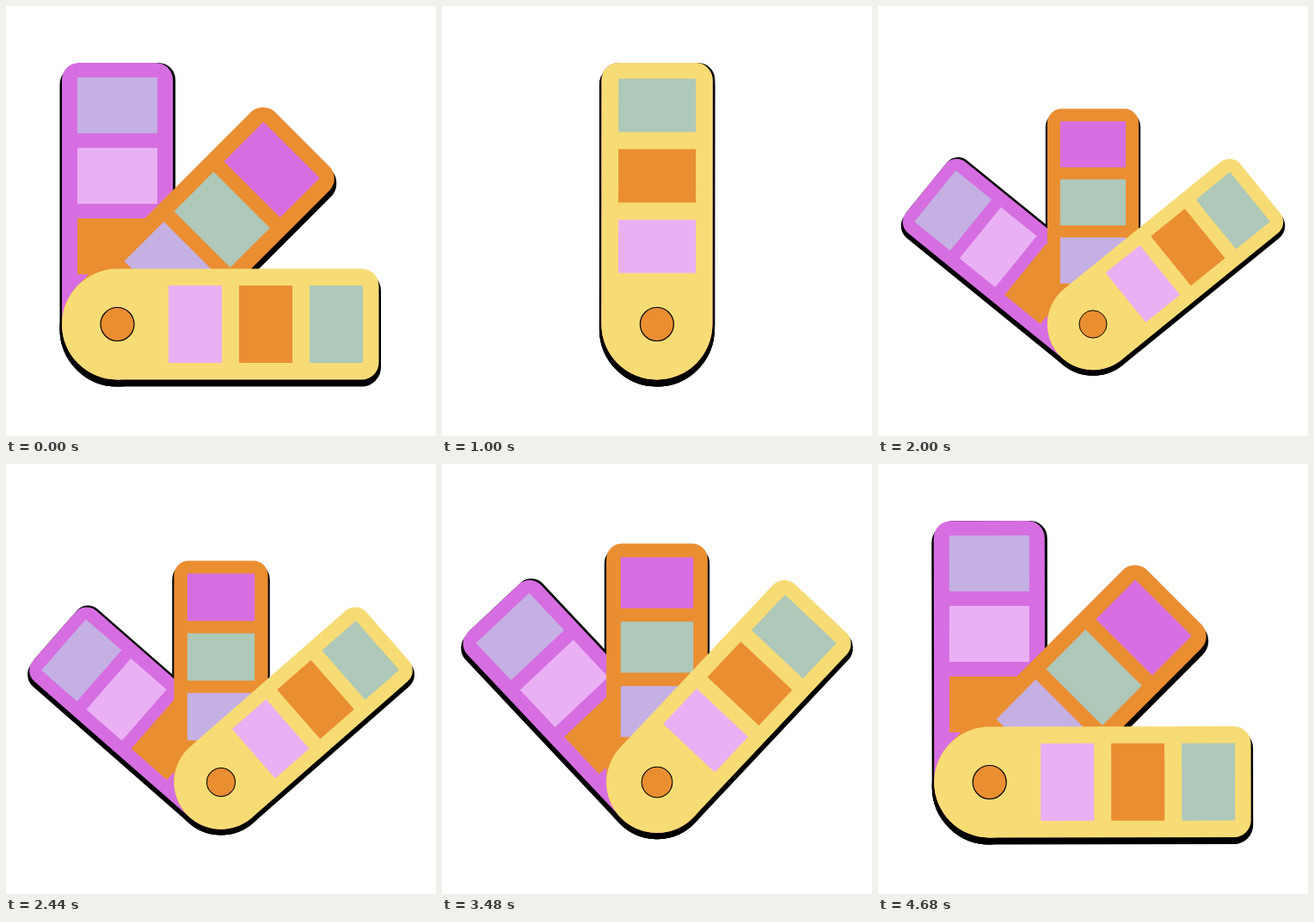
Write an HTML page that moves like this. It is 500 px wide and 500 px high and loops after 5 s.

```html
<!DOCTYPE html>
<html lang="en">
<head>
<meta charset="utf-8">
<title>Swatch fan</title>
<style>
html, body { margin: 0; width: 100%; height: 100%; overflow: hidden; background: #fff; }
svg { display: block; width: 100vw; height: 100vh; }
</style>
</head>
<body>
<svg viewBox="0 0 500 500">
  <g id="fan">
    <g id="shadow" transform="translate(0 5.5)" stroke="#000" stroke-width="5"></g>
    <g id="cards"></g>
    <circle r="19.5" fill="#ea8e32" stroke="#000" stroke-width="1.2"/>
  </g>
</svg>
<script>
const LOOP = 5000;
const PURPLE = '#d66ee1', ORANGE = '#ea8e32', YELLOW = '#f7dc75';
const LILAC = '#c5b0e4', PINK = '#eab0f4', SAGE = '#aec8b9';
const CARD = 'M-64.5 0V-284a20 20 0 0 1 20-20H44.5a20 20 0 0 1 20 20V0A64.5 64.5 0 0 1-64.5 0Z';

// swatches run from the outer end towards the pin
const DECK = [
  { fill: PURPLE, swatches: [LILAC, PINK, ORANGE], w: 93, h: 65, top: -287, edge: 3 },
  { fill: ORANGE, swatches: [PURPLE, SAGE, LILAC], w: 92.5, h: 65, top: -286.5 },
  { fill: YELLOW, swatches: [SAGE, ORANGE, PINK], w: 90, h: 62, top: -285.5 }
];

// x of the pin, scale, angle of each card
const OPEN = [129.5, 1, 0, 45, 90];
const SHUT = [250, 1, 0, 0, 0];
const WIDE = [250, 0.82, -52, 0, 52];
const NARROW = [250, 1.05, -25, 0, 25];
const MEDIUM = [250, 0.9, -45, 0, 45];

// start, end, ease strength, from, to
const MOVES = [
  [0, 1040, 0.82, OPEN, SHUT],
  [1340, 2130, 0.75, SHUT, WIDE],
  [2200, 2920, 0.75, WIDE, NARROW],
  [2920, 3720, 0.75, NARROW, MEDIUM],
  [3920, 4720, 0.68, MEDIUM, OPEN]
];

const $ = id => document.getElementById(id);

function add(parent, tag, attrs) {
  const el = document.createElementNS('http://www.w3.org/2000/svg', tag);
  for (const k in attrs) el.setAttribute(k, attrs[k]);
  return parent.appendChild(el);
}

const parts = DECK.map(c => {
  const back = add($('shadow'), 'path', { d: CARD });
  const g = add($('cards'), 'g', {});
  if (c.edge) add(g, 'path', { d: CARD, transform: `translate(${c.edge} 0)` });
  add(g, 'path', { d: CARD, fill: c.fill });
  c.swatches.forEach((fill, i) =>
    add(g, 'rect', { x: -c.w / 2, y: c.top + 82 * i, width: c.w, height: c.h, fill }));
  return [back, g];
});

// cubic-bezier(a, 0, 1 - a, 1)
function ease(x, a) {
  if (x <= 0) return 0;
  if (x >= 1) return 1;
  let lo = 0, hi = 1, u;
  for (let i = 0; i < 24; i++) {
    u = (lo + hi) / 2;
    const v = 1 - u;
    if (3 * v * v * u * a + 3 * v * u * u * (1 - a) + u * u * u < x) lo = u;
    else hi = u;
  }
  return u * u * (3 - 2 * u);
}

function pose(t) {
  const [start, end, a, from, to] = MOVES.filter(m => t >= m[0]).pop();
  const p = ease((t - start) / (end - start), a);
  return from.map((v, i) => v + (to[i] - v) * p);
}

function draw(t) {
  const [x, scale, ...angles] = pose(t);
  $('fan').setAttribute('transform', `translate(${x} 370) scale(${scale})`);
  parts.forEach((pair, i) =>
    pair.forEach(el => el.setAttribute('transform', `rotate(${angles[i]})`)));
}

let begin;
function tick(now) {
  begin ??= now;
  draw(Math.max(0, now - begin) % LOOP);
  requestAnimationFrame(tick);
}
draw(0);
requestAnimationFrame(tick);
</script>
</body>
</html>
```
